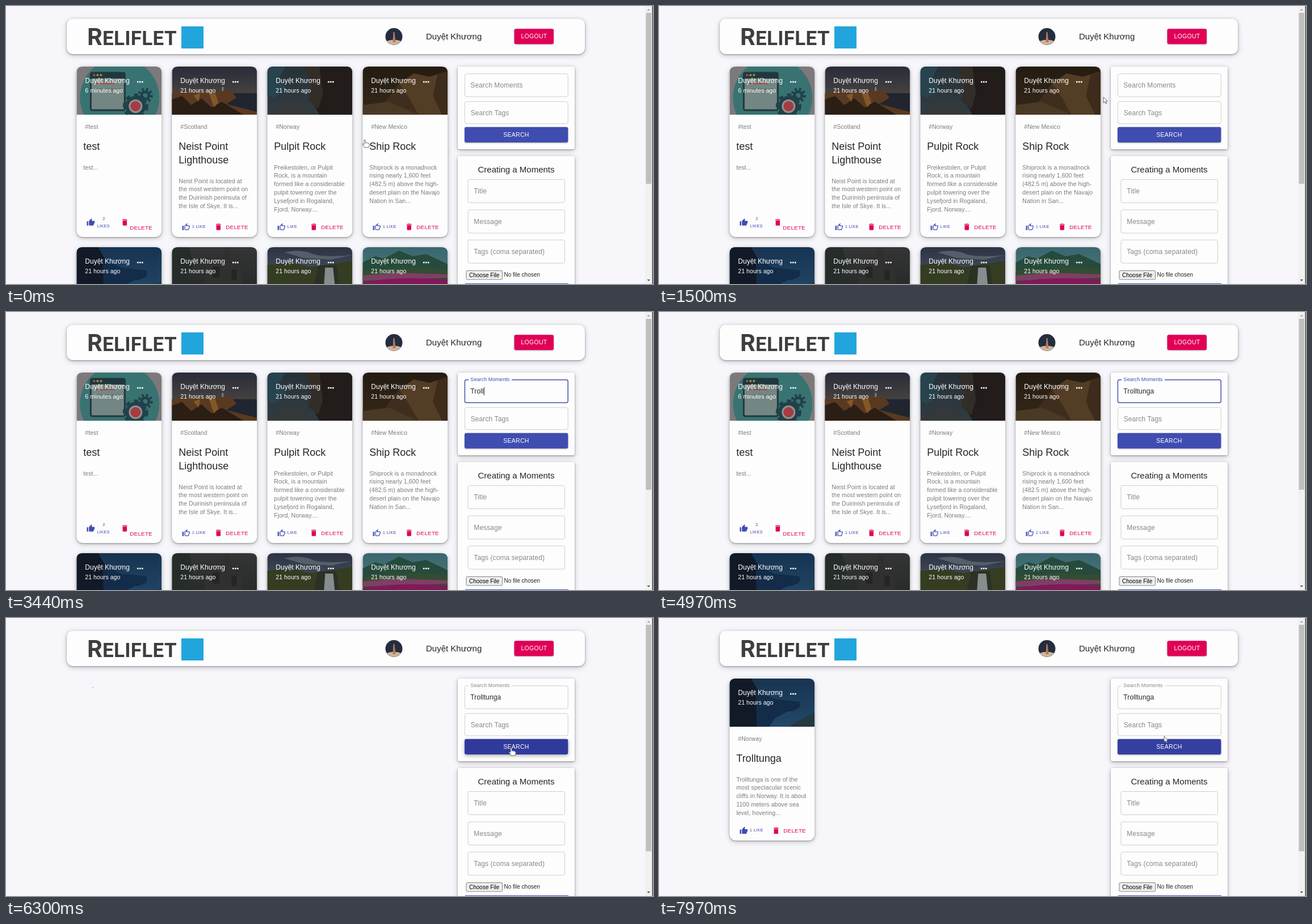
An HTML page for the animation above (8 s loop, 1140 by 491 pixels).

```html
<!DOCTYPE html>
<html lang="en">
<head>
<meta charset="utf-8">
<title>Photo journal search</title>
<style>
  html, body { margin: 0; width: 100%; height: 100%; overflow: hidden; background: #f6f6fb; }
  svg { display: block; }
  text { font-family: "Liberation Sans", Arial, sans-serif; white-space: pre; }
  .paper { fill: #fdfdfe; filter: drop-shadow(0 1.5px 1.5px #0005) drop-shadow(0 2px 5px #0003); }
  .caps { letter-spacing: .0286em; }
  .body { letter-spacing: .07px; }
</style>
</head>
<body>
<svg id="stage" width="1140" height="491" viewBox="0 0 1140 491"></svg>
<script>
const BLUE = '#3f4db0', DARK_BLUE = '#303a9c', PINK = '#e00057', GREY = '#7c7c7c', INK = '#252525';
const USER = 'Duyệt Khương';

const text = (x, y, size, str, fill = INK, attrs = '') =>
  `<text x="${x}" y="${y}" font-size="${size}" fill="${fill}" ${attrs}>${str}</text>`;
const lines = (x, y, size, step, str, fill, attrs) =>
  str.split('\n').map((s, i) => text(x, y + i * step, size, s, fill, attrs)).join('');
const rect = (x, y, w, h, fill, attrs = '') =>
  `<rect x="${x}" y="${y}" width="${w}" height="${h}" fill="${fill}" ${attrs}/>`;
const circle = (x, y, r, fill, attrs = '') => `<circle cx="${x}" cy="${y}" r="${r}" fill="${fill}" ${attrs}/>`;
const path = (d, fill, attrs = '') => `<path d="${d}" fill="${fill}" ${attrs}/>`;
const at = (x, y, content, attrs = '') => `<g transform="translate(${x} ${y})" ${attrs}>${content}</g>`;
const paper = (x, y, w, h, r) => rect(x, y, w, h, '', `rx="${r}" class="paper"`);

// Photos, each 150 x 85
const sky = (id, top, bottom) =>
  `<linearGradient id="${id}" x2="0" y2="1"><stop stop-color="${top}"/><stop offset="1" stop-color="${bottom}"/></linearGradient>` +
  rect(0, 0, 150, 85, `url(#${id})`);
const gear = (x, y, r) =>
  circle(x, y, r, '#20424a') +
  circle(x, y, r + 2, 'none', `stroke="#20424a" stroke-width="5" stroke-dasharray="${r * .42} ${r * .42}"`);

const photos = {
  gears: rect(0, 0, 150, 85, '#7d797a') + circle(76, 55, 70, '#387372') +
    rect(25, 11, 60, 66, '#748683', 'rx="3" stroke="#20383d" stroke-width="3"') +
    rect(25, 10, 60, 11, '#20383d') +
    circle(31, 15, 2, '#b44c40') + circle(37, 15, 2, '#b38a38') + circle(43, 15, 2, '#b38a38') +
    rect(34, 29, 34, 2, '#a14a48') + rect(34, 39, 44, 2, '#59706f') +
    gear(121, 51, 9) + circle(121, 51, 4, '#387372') +
    gear(104, 70, 18) + circle(104, 70, 12, '#8d9291') + circle(104, 70, 9, '#a83a42'),
  cliff: sky('g1', '#282d39', '#5e5046') +
    path('M0 47H150V85H0z', '#20252f') +
    path('M0 47L30 44 104 43 114 55 96 66 150 80V85H0z', '#593a20') +
    path('M0 58L18 52 34 68 52 56 70 72 88 62 126 85H0z', '#2b1e14') +
    path('M66 49L76 46 82 64 74 72zM38 51L50 47 47 62z', '#835829') + path('M88 43v-7h3v7z', '#807a70'),
  pulpit: sky('g2', '#263138', '#313b42') +
    path('M0 0H32L22 18 34 40 12 56 0 50z', '#26434e') +
    path('M76 0H150V85H92L78 60 84 34z', '#221d1a') +
    path('M66 0H92L98 48 90 75 72 60 78 34z', '#332d28') + path('M0 85L30 60 60 62 80 85z', '#34383a'),
  ridge: sky('g3', '#241c11', '#35281a') +
    path('M64 30L90 12 118 18 150 8V85H98L82 56z', '#543d25') +
    path('M64 30L82 56 98 85H50L40 62z', '#3f2e1d') +
    path('M132 14L150 8V85H140L124 52z', '#3d2c1b') + path('M0 68L46 62 98 85H0z', '#4a3925'),
  tongue: sky('g4', '#173451', '#224868') +
    path('M0 0H38L52 24 80 40 118 43Q125 58 98 58L74 69 66 85H0z', '#111a26') +
    path('M46 20L78 36 123 41Q130 55 104 57L80 70 70 85H48z', '#132c49') +
    path('M150 60L126 72 104 85H150z', '#263840'),
  castle: sky('g5', '#343536', '#232a27') +
    path('M0 0H30L38 30 24 60 32 85H0z', '#252c2a') +
    path('M58 85V24L64 14 70 24V18H90V8L97 0 104 8V26H124V85z', '#30302f') +
    path('M72 34h12v20H72zM105 40h9v18h-9z', '#242526'),
  falls: sky('g6', '#2c3343', '#56636f') +
    path('M30 9Q60 3 78 11T150 14L112 22 64 19z', '#555e69') +
    path('M0 31L46 28 76 35 150 24V85H0z', '#343c22') +
    path('M90 32H122L130 85H78z', '#2c3125') + path('M102 36H116L119 66H100z', '#858d8e'),
  blossom: sky('g7', '#39676f', '#577d7d') +
    path('M0 27L22 16 38 20 64 6 88 16 112 12 150 30V58H0z', '#264b3c') +
    path('M0 42Q76 30 150 40V85H0z', '#344c34') +
    path('M0 50L62 45 150 48V54L0 59z', '#7d4064') + path('M0 62Q68 50 150 58V85H0z', '#82185a'),
};

const THUMB = 'M1 21h4V9H1zM23 10q0-2-2-2h-6.3l1-4.9L14 1 7.6 7.6Q7 8.2 7 9v10q0 2 2 2h9q1.3 0 1.8-1.2l3-7 .2-.8z';
const THUMB_LINE = 'M2 20h2.5V10H2zM22 11q0-2-2-2h-6.6l1-5L8.5 9.4V18q0 2 2 2h8z';
const BIN = 'M6 19q0 2 2 2h8q2 0 2-2V7H6zM19 4h-3.5l-1-1h-5l-1 1H5v2h14z';
const icon = (x, y, d, attrs) => `<path transform="translate(${x - 7.5} ${y - 7.5}) scale(.625)" d="${d}" ${attrs}/>`;
const thumb = (x, y, filled) => filled
  ? icon(x, y, THUMB, `fill="${BLUE}"`)
  : icon(x, y, THUMB_LINE, `fill="none" stroke="${BLUE}" stroke-width="2"`);
const label = (x, y, str, fill, size) => text(x, y, size, str, fill, 'class="caps"');
const remove = (x, y, tx, ty) => icon(x, y, BIN, `fill="${PINK}"`) + label(tx, ty, 'DELETE', PINK, 9.75);
const actions = (y, likes, filled) =>
  thumb(25, y, filled) + label(35.5, y + 1.7, likes, BLUE, 7.5) + remove(82, y, 95, y + 3.8);

function card(x, y, height, photo, { ago = '21 hours ago', tag = '', title = '', body = '', foot = '' } = {}) {
  const extra = 24 * (title.split('\n').length - 1);
  return at(x, y,
    paper(0, 0, 150, height, 11.25) +
    `<g clip-path="url(#top)">${photos[photo]}</g>` +
    text(15, 29, 12, USER, '#fff') + text(15, 46, 10.5, ago, '#fff', 'class="body"') +
    [108, 112, 116].map(cx => circle(cx, 27, 1.5, '#fff')).join('') +
    text(15, 110, 10.5, tag, GREY, 'class="body"') +
    lines(12, 147, 18, 24, title, INK) +
    lines(12, 181.5 + extra, 10.5, 14.8, body, GREY, 'class="body"') + foot);
}

const allCards =
  card(124.3, 107, 301, 'gears', {
    ago: '6 minutes ago', tag: '#test', title: 'test', body: 'test...',
    foot: thumb(25, 275, true) + label(46, 271, '2', BLUE, 7.5) + label(36, 284, 'LIKES', BLUE, 7.5) +
      remove(85, 275, 94, 287.5) }) +
  card(292.3, 107, 301, 'cliff', {
    tag: '#Scotland', title: 'Neist Point\nLighthouse',
    body: 'Neist Point is located at\nthe most western point on\nthe Duirinish peninsula of\nthe Isle of Skye. It is...',
    foot: actions(283, '1 LIKE') }) +
  card(460.3, 107, 301, 'pulpit', {
    tag: '#Norway', title: 'Pulpit Rock',
    body: 'Preikestolen, or Pulpit\nRock, is a mountain\nformed like a considerable\npulpit towering over the\nLysefjord in Rogaland,\nFjord, Norway....',
    foot: actions(283, 'LIKE') }) +
  card(628.3, 107, 301, 'ridge', {
    tag: '#New Mexico', title: 'Ship Rock',
    body: 'Shiprock is a monadnock\nrising nearly 1,600 feet\n(482.5 m) above the high-\ndesert plain on the Navajo\nNation in San...',
    foot: actions(283, '1 LIKE') }) +
  ['tongue', 'castle', 'falls', 'blossom'].map((p, i) => card(124.3 + 168 * i, 426, 300, p)).join('');

const foundCard = card(124.3, 107, 286, 'tongue', {
  tag: '#Norway', title: 'Trolltunga',
  body: 'Trolltunga is one of the\nmost spectacular scenic\ncliffs in Norway. It is about\n1100 meters above sea\nlevel, hovering...',
  foot: actions(268.5, '1 LIKE', true) });

const field = (x, y, w, h, hint, id = '') =>
  rect(x, y, w, h, 'none', `id="${id}" rx="3" stroke="#c9c9cb" stroke-width=".9"`) +
  (hint && text(x + 10.3, y + h / 2 + 4.3, 12, hint, '#888', 'letter-spacing=".1"'));

const header =
  paper(107, 22.5, 913, 62.5, 11) +
  `<text x="143" y="69" font-weight="700" fill="#3e3d40" style="font-family:Roboto,sans-serif;letter-spacing:.3px"><tspan font-size="42">R</tspan><tspan font-size="35">ELIFLET</tspan></text>` +
  rect(309, 36, 39, 39, '#22a5dc') +
  at(668.5, 39, circle(15, 15, 15, '#242d40') + path('M2.5 23Q15 18 27.5 23A15 15 0 0 1 2.5 23z', '#cdb59b') +
    path('M13 25L14 7h2l2 18z', '#b5785a')) +
  text(740, 59, 15, USER) +
  rect(895.5, 40.3, 69.5, 27, PINK, 'rx="3" style="filter:drop-shadow(0 1px 1px #0004)"') +
  label(907.4, 57.3, 'LOGOUT', '#fff', 10.5);

const sidebar =
  paper(796, 107, 206, 146, 3) +
  field(808.4, 119.8, 181.8, 40.4, '', 'moments') +
  rect(815, 117, 76, 5, '#fdfdfe', 'id="notch"') +
  text(0, 0, 12, 'Search Moments', '#888', 'id="hint" letter-spacing=".1"') +
  text(818.3, 144.1, 12, '', INK, 'id="typed" letter-spacing=".1"') +
  rect(818.5, 133, 1, 14, INK, 'id="caret"') +
  field(808.4, 168.8, 181.8, 39, 'Search Tags', 'tags') +
  rect(808, 213.8, 182.3, 27.2, BLUE, 'id="button" rx="3"') +
  label(876.2, 231, 'SEARCH', '#fff', 10.5) +
  paper(796, 265, 206, 300, 3) +
  text(899, 294, 15, 'Creating a Moments', INK, 'text-anchor="middle"') +
  field(814, 306.5, 170.5, 41, 'Title') + field(814, 360, 170.5, 41, 'Message') +
  field(814, 413.2, 170.5, 41, 'Tags (coma separated)') +
  rect(811, 467.5, 63.5, 15.5, '#efefef', 'rx="1.5" stroke="#767676" stroke-width=".9"') +
  text(816, 479, 10, 'Choose File', '#000') + text(877.5, 478.3, 10, 'No file chosen') +
  rect(809, 490, 182, 4, BLUE);

const scrollbar =
  rect(1126, 0, 12.5, 491, '#f1f1f1') + rect(1138.5, 0, 1.5, 491, '#4a4a4e') +
  rect(1127.5, 12, 9.5, 302, '#bfbfc0', 'id="thumb"') +
  path('M1129.5 8L1132.2 5 1135 8z', '#a3a3a3') + path('M1129.5 483L1132.2 486 1135 483z', '#505050');

const HAND = 'M-1 1Q0-1 1.3 1V6Q3 4.6 4 6.2 5.6 5 6.4 6.8 8 6 8.2 8V10Q8 12 7 14H0Q-1.5 11-3.6 8.7-4 6.6-2 7.6L-1 8.6z';
const ARROW = 'M0 0V10.2L2.4 8 4 11.8 5.6 11.1 4 7.4H7.2z';
const pointer = (id, d) => path(d, '#fff', `id="${id}" stroke="#444" stroke-width=".8"`);

stage.innerHTML =
  `<clipPath id="top">${path('M0 85V11.25Q0 0 11.25 0H138.75Q150 0 150 11.25V85z', '')}</clipPath>` +
  rect(0, 0, 1140, 491, '#f6f6fb') + header +
  `<g id="all">${allCards}</g><g id="found">${foundCard}</g>` +
  at(124, 107, `<g id="spinner" transform-origin="15 15">${circle(15, 15, 13.77, 'none', `id="arc" stroke="${BLUE}" stroke-width="2.45"`)}</g>`) +
  sidebar + scrollbar + pointer('hand', HAND) + pointer('arrow', ARROW);

const $ = id => document.getElementById(id);
const show = (id, on) => $(id).setAttribute('display', on ? 'inline' : 'none');
const set = (id, attrs) => Object.entries(attrs).forEach(([k, v]) => $(id).setAttribute(k, v));
const ramp = (t, a, b) => Math.min(1, Math.max(0, (t - a) / (b - a)));
const easeOut = p => 1 - (1 - p) ** 3;
const easeInOut = p => p * p * (3 - 2 * p);
const mix = (a, b, p) => a + (b - a) * p;

const LOOP = 8000, FOCUS = 2100, BLUR = 6180, CLEAR = 6290, RESULT = 6800, BLINK = 530;
const WORD = 'Trolltunga';
const KEYS = [2670, 2940, 3070, 3300, 3440, 3840, 4000, 4200, 4340, 4440];
// Pointer moves: start, end, x, y
const START = [632, 236];
const MOVES = [
  [40, 140, 606, 222], [340, 500, 590, 213], [670, 700, 584, 210],
  [1240, 1640, 860, 142], [5670, 6120, 890, 229], [7740, 7970, 890, 209],
];
const pointerAt = t => MOVES.reduce(([x, y], [a, b, x2, y2]) => {
  const p = easeInOut(ramp(t, a, b));
  return [mix(x, x2, p), mix(y, y2, p)];
}, START);

function render(t) {
  const [x, y] = pointerAt(t);
  const inside = (l, top, r, b) => x >= l && x <= r && y >= top && y <= b;
  const overMoments = inside(808, 119, 990, 161), overTags = inside(808, 168, 990, 208);
  const overCard = t < CLEAR && inside(124, 107, 778, 408) && (x - 124) % 168 <= 150;
  const overHand = overCard || inside(808, 213.8, 990, 241);
  show('hand', overHand);
  show('arrow', !overHand && !overMoments && !overTags);
  for (const id of ['hand', 'arrow']) set(id, { transform: `translate(${x} ${y})` });

  const focused = t >= FOCUS && t < BLUR;
  const raise = easeOut(ramp(t, FOCUS, FOCUS + 200));
  set('moments', {
    stroke: focused ? '#4853a6' : overMoments ? '#333' : '#c9c9cb',
    'stroke-width': focused ? 1.5 : .9,
  });
  set('tags', { stroke: overTags ? '#333' : '#c9c9cb' });
  set('notch', { width: 76 * raise });
  set('hint', {
    transform: `translate(818.3 ${mix(144.1, 122.2, raise)}) scale(${mix(1, .75, raise)})`,
    fill: focused ? BLUE : '#888',
  });

  const count = KEYS.filter(k => t >= k).length;
  $('typed').textContent = WORD.slice(0, count);
  const lastInput = count ? KEYS[count - 1] : FOCUS + 10;
  show('caret', focused && (t - lastInput) % (2 * BLINK) < BLINK);
  set('caret', { x: 818.5 + (count ? $('typed').getComputedTextLength() : 0) });

  const hover = ramp(t, 6050, 6290) - ramp(t, 7910, 8160);
  const press = ramp(t, BLUR, CLEAR) - ramp(t, 6350, 6600);
  $('button').style.fill = `color-mix(in srgb, ${DARK_BLUE} ${hover * 100}%, ${BLUE})`;
  $('button').style.filter = `drop-shadow(0 ${1 + hover * .5 + press}px ${1 + hover + press}px #0005)`;

  show('all', t < CLEAR);
  show('found', t >= RESULT);
  show('spinner', t >= CLEAR && t < RESULT);
  const turn = Math.max(0, t - CLEAR) / 1400;
  const grow = easeInOut(ramp(turn, 0, .5)), unit = 30 / 44;
  set('spinner', { transform: `rotate(${turn * 360})` });
  set('arc', {
    'stroke-dasharray': `${mix(1, 100, grow) * unit} ${200 * unit}`,
    'stroke-dashoffset': -15 * grow * unit,
  });
  set('thumb', { height: t < CLEAR ? 302 : 400 });
}

const start = performance.now();
(function frame() {
  render((performance.now() - start) % LOOP);
  requestAnimationFrame(frame);
})();
</script>
</body>
</html>
```
